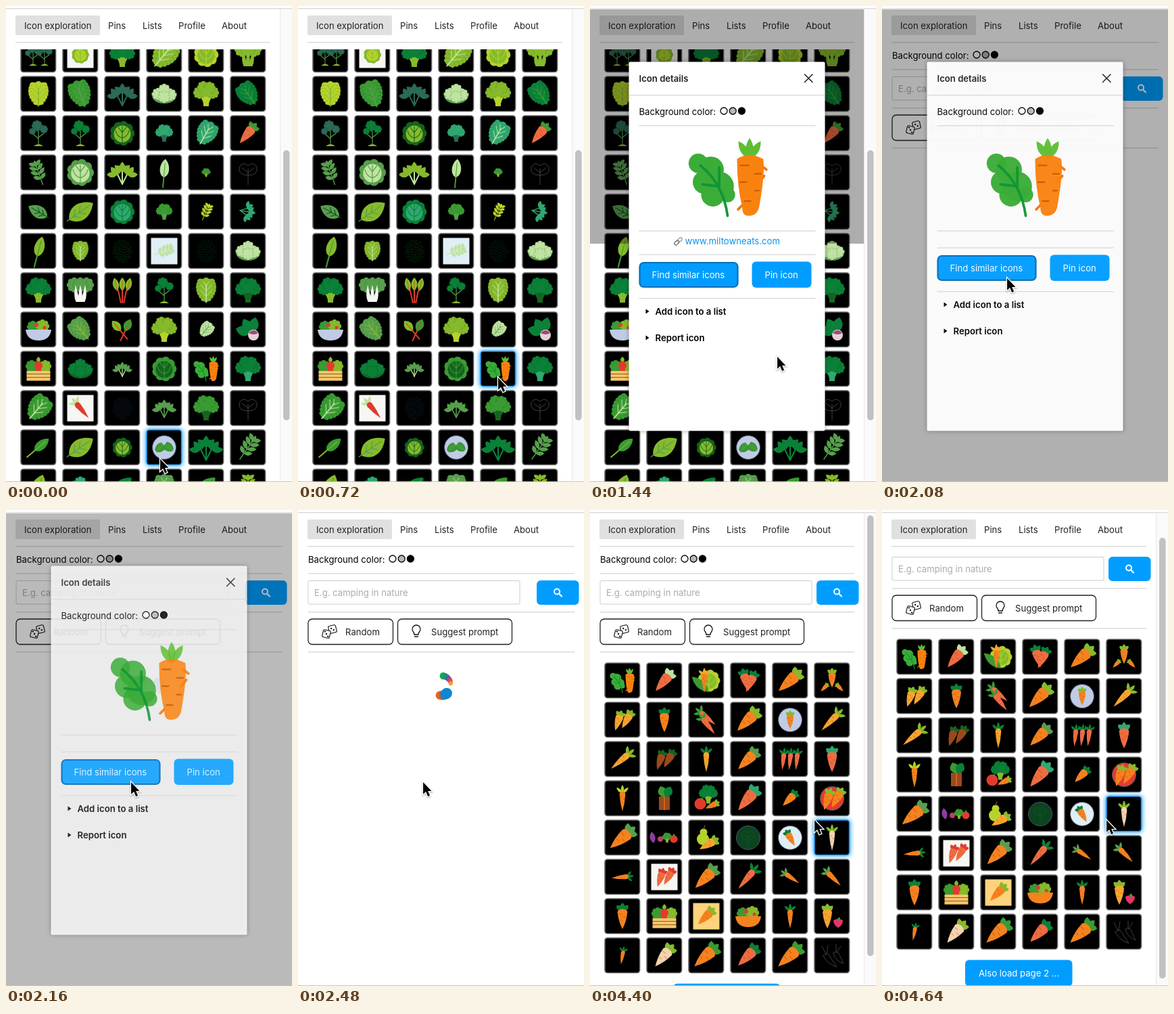
An HTML page with a canvas for the animation above (5140 ms loop, 423 px wide and 703 px high).

```html
<!DOCTYPE html>
<html lang="en">
<head>
<meta charset="utf-8">
<title>Icon exploration</title>
<style>
html, body { margin: 0; width: 423px; height: 703px; overflow: hidden; background: #fff; }
canvas { display: block; }
</style>
</head>
<body>
<canvas id="stage" width="423" height="703"></canvas>
<script>
const c = document.getElementById('stage').getContext('2d');
const LOOP = 5140, STEP = 80, BLUE = '#009dff';

const palette = {
  g: '#3a9b32', d: '#14641f', D: '#0c4420', l: '#86ba2c', y: '#b5d32c', p: '#bfe3a0', v: '#579f4c',
  t: '#2c6a55', m: '#2fa870', k: '#0b8038', o: '#f5821f', a: '#f7a52f', r: '#e23b2e', s: '#ee6c42',
  w: '#f6f6f2', b: '#c0cbe6', i: '#e0eef6', x: '#4a504a', z: '#163c5c', n: '#9a4a1c', c: '#f4d3ae', h: '#ffd27d'
};

// ---- drawing helpers ----
function fill(color, path) { c.fillStyle = color; c.fill(new Path2D(path)); }
function stroke(color, width, path) {
  c.strokeStyle = color; c.lineWidth = width; c.lineCap = 'round'; c.stroke(new Path2D(path));
}
function dot(x, y, r, color, edge, width = 1) {
  c.beginPath(); c.arc(x, y, r, 0, 7);
  c.fillStyle = color; c.fill();
  if (edge) { c.strokeStyle = edge; c.lineWidth = width; c.stroke(); }
}
function box(x, y, w, h, r, color, edge, width = 1) {
  c.beginPath(); c.roundRect(x, y, w, h, r);
  if (color) { c.fillStyle = color; c.fill(); }
  if (edge) { c.strokeStyle = edge; c.lineWidth = width; c.stroke(); }
}
function text(str, x, y, color = '#222', weight = 400) {
  c.font = `${weight} 13.15px Inter, sans-serif`;
  c.fillStyle = color; c.fillText(str, x, y);
}
function rule(x1, x2, y) { box(x1, y - 0.5, x2 - x1, 1.5, 0, '#dcdcdc'); }
function bush(color, x, y, r, n = 8) {
  for (let i = 0; i < n; i++) {
    const a = i / n * 2 * Math.PI;
    dot(x + Math.cos(a) * r * 0.65, y + Math.sin(a) * r * 0.65, r * 0.37, color, 'rgba(0,30,0,.16)', 0.8);
  }
  dot(x, y, r * 0.66, color);
}
function leaflet(color, x, y, len, width, deg) {
  c.save(); c.translate(x, y); c.rotate(deg * Math.PI / 180);
  fill(color, `M0 0Q${-width} ${-len / 2} 0 ${-len}Q${width} ${-len / 2} 0 0Z`);
  c.restore();
}
function root(a, b, w) {
  for (const deg of [-48, 48, 0]) leaflet(b, 0, -8, 12, w, deg);
  fill(a, `M${-w}-6C${-w}-12 ${w}-12 ${w}-6Q${w * 0.85} 7 0 19Q${-w * 0.85} 7 ${-w}-6Z`);
  stroke('rgba(150,50,0,.4)', 0.9, `M${-w * 0.8}-3h${w * 0.7}M${w * 0.7} 1h${-w * 0.6}M${-w * 0.5} 6h${w * 0.5}`);
}

// ---- icons: each is drawn around 0,0 and about 38 px wide ----
const shapes = {
  carrot: (a, b) => root(a, b, 7.3),
  slim: (a, b) => root(a, b, 4.3),
  carrots(a, b, cols) { icon(`carrot:${cols}:18`, -6, 1, 0.8); icon(`carrot:${cols}:30`, 7, -1, 0.8); },
  crossed(a, b, cols) { icon(`carrot:${cols}:-15`, -4, -1, 0.9); icon(`carrot:${cols}:25`, 4, 1, 0.9); },
  pair(a, b, cols) { icon(`slim:${cols}:-50`, -1, -5); icon(`slim:${cols}:-38`, 1, 6); },
  slims(a, b, cols) { for (const x of [-10, 0, 10]) icon(`slim:${cols}:6`, x, 0, 0.85); },
  trio(a, b, cols) {
    icon(`carrot:${cols}`, 0, -4, 0.75);
    icon(`carrot:${cols}:-45`, 11, 10, 0.42); icon(`carrot:${cols}:45`, -11, 10, 0.42);
  },
  duo() {
    for (const [x, y, r] of [[-14, -7, 4.6], [-8, -4, 6.2], [-11, 2, 5.6], [-4, 4, 7], [-7, 8, 5.6], [0, 8, 3.6]])
      dot(x, y, r, '#3bac38');
    stroke('#0f9537', 1.2, 'M-13-6Q-2 3 0 18M-4 4L-4-5M-4 4L-12 3');
    for (const deg of [-32, 0, 32]) leaflet('#5fbd35', 10.5, -9, 10, 3.5, deg);
    stroke('#ee760d', 1.2, 'M16-6L18.500-4M15 2L17.500-1M7 13L5 15');
    fill('#f9820f', 'M4.500-9Q10-13 17-9Q18-2 15 14Q14 18 10 18Q7 18 7 14Q4.500 4 4.500-9Z');
    stroke('#c65f08', 0.7, 'M6-6h4M13-2h3M6 2h3M13 6h2M8 11h3');
  },
  broccoli(a, b) {
    fill(b, 'M-4 18Q-3 10-11 2H11Q3 10 4 18Z');
    bush(a, -10, -2, 9); bush(a, 10, -2, 9); bush(a, -4, -10, 9); bush(a, 5, -9, 9); dot(0, -3, 7, a);
  },
  tree(a) {
    stroke(palette.v, 1.2, 'M0 18V-6M0 6L8 0M0 8L-8 1');
    bush(a, -2, -11, 8); bush(a, 8, -6, 6); bush(a, -9, -3, 5);
    fill(palette.l, 'M-7 19Q0 13 7 19Z');
  },
  trees(a, b, cols) { icon(`tree:${cols}`, -8, 0, 0.85); icon(`tree:${cols}`, 9, 0, 0.85); },
  lettuce(a, b) {
    for (let i = 0; i <= 6; i++) {
      const half = 13 * Math.sin(0.9 + i * 0.3), y = -13 + i * 4.3;
      for (const side of [-1, 1]) dot(side * half * 0.85, y, 4.6 - i * 0.25, a, 'rgba(0,30,0,.16)', 0.8);
      box(-half * 0.8, y - 4, half * 1.6, 8, 3, a);
    }
    dot(0, -14, 5, a);
    stroke(b, 1.6, 'M0 18V-8'); stroke(b, 0.9, 'M0 9L-8 0M0 9L8 0M0 1L-8-8M0 1L8-8M0-6L-4-13M0-6L4-13');
  },
  cabbage(a, b) {
    bush(a, 0, 0, 18, 9); dot(0, 1, 12.5, b);
    stroke(a, 1.1, 'M0 14V-10M0 7Q-8 5-10-4M0 7Q8 5 10-4M0-1L-6-9M0-1L6-9');
  },
  florets(a, b) {
    fill(a, 'M-19-2Q0 14 19-2Q18 14 0 14Q-18 14-19-2Z');
    for (const [x, y] of [[-9, 0], [9, 1], [0, -6], [0, 4]]) bush(b, x, y, 9);
  },
  leaf(a, b) {
    fill(a, 'M0 17C-15 8-12-8 0-19C12-8 15 8 0 17Z');
    stroke(b, 1.1, 'M0 20V-13M0 10L-6 4M0 10L6 4M0 2L-6-4M0 2L6-4');
  },
  spoon(a, b) {
    stroke(b, 2, 'M0 22V4'); fill(a, 'M0 7C-9 4-9-12 0-20C9-12 9 4 0 7Z'); stroke(b, 1, 'M0 6V-14');
  },
  sprig(a) {
    stroke(a, 1.4, 'M0 19V-12');
    for (let y = 10; y > -13; y -= 7)
      for (const side of [-1, 1]) leaflet(a, 0, y, 14 - Math.abs(y) / 4, 6, side * 55);
    leaflet(a, 0, -8, 11, 6, 0);
  },
  fan(a, b) {
    for (const x of [-1, 1, 0]) {
      stroke(b, 2, `M0 17L${x * 8} ${x ? 1 : -4}`);
      for (const deg of [-50, 0, 50]) leaflet(a, x * 8, x ? 4 : -1, 15, 8, x * 35 + deg);
    }
  },
  choy(a, b) {
    for (const x of [-9, 9, 0]) { bush(a, x, -8, 11); dot(x, -8, 8, a); }
    for (const x of [-7, 7, 0]) fill(b, `M${x / 2 - 3} 17Q${x - 4} 8 ${x}-8Q${x + 4} 8 ${x / 2 + 3} 17Z`);
  },
  chard(a, b) {
    for (const x of [-9, 9, 0]) {
      stroke(b, 2, `M${x / 4} 18Q${x / 2} 4 ${x}-9`);
      leaflet(a, x * 0.8, 1, 20, 9, x * 1.5);
      stroke(b, 0.8, `M${x * 0.8} 1L${x * 1.2}-14`);
    }
  },
  stalks(a, b) {
    for (const [turn, x] of [[-40, -4], [25, 5]]) {
      c.save(); c.translate(x, 0); c.rotate(turn * Math.PI / 180);
      stroke(b, 2, 'M0 18V-6'); leaflet(x < 0 ? palette.l : a, 0, 3, 20, 12, 0); stroke(b, 1, 'M0 3V-12');
      c.restore();
    }
  },
  beet(a) {
    for (const deg of [-75, -30, 15]) leaflet(a, 5, 5, 24, 15, deg);
    dot(8, 8, 8, '#e6cfd6'); fill('#9b4a78', 'M1 5Q8-3 15 5Q8 9 1 5Z');
  },
  bowl(a, b) {
    bush(b, -8, -4, 9); bush(palette.l, 6, -5, 10);
    dot(-3, -7, 3, palette.r); dot(9, -3, 2.5, palette.r);
    fill(a, 'M-19 0H19Q17 16 0 16Q-17 16-19 0Z');
  },
  crate(a, b) {
    bush(b, -10, -4, 9); bush(palette.l, 10, -4, 9); dot(-10, 0, 6, b); dot(10, 0, 6, palette.l);
    leaflet(palette.l, 0, -9, 9, 6, 0); dot(0, -5, 6, palette.r); box(-4, -4, 8, 9, 0, palette.r);
    for (const y of [3, 8, 13]) box(-17.500, y, 35, 4.6, 0, '#f7c568');
  },
  salad() {
    icon('cabbage:yl', 4, 0, 0.9); leaflet(palette.g, 4, 17, 34, 12, -48);
    icon('slim:oa', -3, 0, 0.95);
  },
  stump() {
    fill(palette.n, 'M-8-3H8V17H-8Z'); stroke(palette.o, 1, 'M0-2V17');
    leaflet(palette.g, 0, -2, 17, 13, -20); leaflet(palette.k, 2, -2, 17, 13, 25);
  },
  tomato() {
    icon('broccoli:kl', 3, -6, 0.75); dot(-9, 8, 8.5, palette.r);
    leaflet(palette.g, -9, 2, 5, 3, 60); icon('carrot:ol:65', 9, 10, 0.6);
  },
  medley() {
    leaflet('#8a3fa0', -16, 8, 17, 8, -10); dot(-6, 2, 4, '#c23a6a');
    icon('broccoli:gl', 4, 0, 0.4); dot(14, 2, 5.5, palette.r); leaflet(palette.g, 14, -1, 5, 3, 0);
  },
  pear() {
    dot(-5, 2, 9, palette.y); dot(-4, -8, 5.5, palette.y); stroke(palette.n, 1.2, 'M-4-13L-2-18');
    icon('carrot:al:60', 4, 9, 0.85);
  },
  berry() {
    icon('carrot:al', -7, 0, 0.95);
    fill('#e8336a', 'M2 6Q9 2 16 6Q16 13 9 17Q2 13 2 6Z'); leaflet(palette.g, 9, 7, 6, 4, 20);
  },
  twins() { icon('lettuce:gv:55', -7, 1, 0.42); icon('lettuce:gv:-55', 7, 0, 0.42); },
  outline(a) { stroke(a, 0.8, 'M0 18V-6M0 4Q-15 4-13-8Q-8-17 0-10Q8-17 13-8Q15 4 0 4M0 0L-9-7M0 0L9-7'); },
  roots(a) {
    stroke(a, 0.8, 'M-13 0Q-8-5-4 0L7 17Q-8 12-13 0M2-4Q6-7 10-3L17 12Q4 8 2-4M-9-2L-15-14M-8-2L-6-15M6-5V-16M7-5L13-14');
  },
  dust(a) {
    for (let i = 1; i < 90; i++) {
      const r = 17 * Math.sqrt(i / 90), q = i * 2.4;
      dot(r * Math.cos(q) * 0.85, r * Math.sin(q), 0.6, a);
    }
  },
  disc(a) { dot(0, 0, 17.5, a, '#4a5568', 1); },
  card(a) { box(-19.5, -19.5, 39, 39, 0, a); }
};

// spec: kind:colours:turn:size, layers joined by +
function icon(spec, x, y, scale = 1) {
  for (const part of spec.split('+')) {
    const [kind, cols = 'gl', turn = 0, size = 1] = part.split(':');
    c.save();
    c.translate(x, y); c.scale(scale * size, scale * size); c.rotate(turn * Math.PI / 180);
    shapes[kind](palette[cols[0]], palette[cols[1]], cols);
    c.restore();
  }
}

const greens = `
trees:t card:w+cabbage:ly::.7 broccoli:kl lettuce:lp:40:1.2 cabbage:yl choy:ll
lettuce:yl lettuce:gv:-20:1.1 fan:tt florets:vp broccoli:ly lettuce:kg:-35
tree:t tree:k cabbage:dl broccoli:mt::.7 lettuce:mp:30 carrot:sg:40
sprig:v:-20 cabbage:vp::1.1 fan:lp spoon:pg:5 broccoli:gl::.35 outline:x
leaf:vD:-60:.9 leaf:lv:55:1.2 cabbage:km broccoli:gv::.65 sprig:y:25:.7 fan:mm:100:.7
spoon:lg:15:1.1 lettuce:lp::.8 dust:d card:i+sprig:p:70:.8 dust:D florets:vp
broccoli:kl choy:vw chard:lr tree:k lettuce:lp broccoli:kd
bowl:bg lettuce:vl:-40 stalks:gr broccoli:ly lettuce:pv:40:.65 beet:k
crate:ag florets:dk fan:vp::.65 cabbage:gd duo broccoli:km
lettuce:gp:40:1.1 card:w+slim:rp:-40 dust:z fan:vv::.8 broccoli:gd outline:x
spoon:gl:50 leaf:lv:55:1.2 cabbage:dl::.8 disc:b+twins fan:kk::1.1 sprig:v:35:1.1
leaf:lg:20 florets:dm leaf:kg:45 lettuce:vp leaf:gk:45 sprig:l`.trim().split(/\s+/);

const carrots = `
duo carrot:sp:40:1.05 salad crossed:sk carrot:ol:48:1.2 trio:ol
carrots:al carrot:ok::.95 pair:sg carrot:ol:45:1.2 disc:b+carrot:ol::.7 slim:al:45:1.15
slim:al:50:1.15 carrots:nd slim:ak carrot:ov:45:1.1 slims:sk carrot:sm
slim:oy stump tomato carrot:sm:40:1.2 carrot:ok:45:.8 disc:r+carrots:ol::1.1
carrot:ov:50:1.25 medley pear disc:D+outline:d::.7 disc:i+carrot:ok:-30:.7 slim:cl
slim:ok:85:.85 card:w+carrots:sr::.95 carrot:ov:45:1.2 slim:sk:40:1.2 slim:ov:-55:.85 slim:ov:-45:.95
carrot:ok crate:rg card:h+carrot:ol:45:.9 bowl:og slim:ok::.95 berry
slim:ok:10:.7 carrot:cl:40:1.1 carrot:og:48:1.25 carrot:sk:45:1.1 carrot:og:48:1.25 roots:x`.trim().split(/\s+/);

// ---- motion ----
const path = [[80, 227, 669], [480, 295, 549], [1200, 295, 549], [1440, 276, 518],
  [1840, 184, 402], [2880, 184, 402], [3360, 331, 458]];
function pointer(t) {
  if (t <= path[0][0]) return path[0].slice(1);
  for (let i = 1; i < path.length; i++) {
    const [t1, x1, y1] = path[i], [t0, x0, y0] = path[i - 1];
    if (t > t1) continue;
    const k = (t - t0) / (t1 - t0), e = k * k * (3 - 2 * k);
    return [x0 + (x1 - x0) * e, y0 + (y1 - y0) * e];
  }
  return path[path.length - 1].slice(1);
}
function tileAt(t, top) {
  const [x, y] = pointer(t), col = Math.floor((x - 21) / 62), row = Math.floor((y - top + 1) / 58);
  return (x - 21) % 62 < 54 && (y - top + 1) % 58 < 54 ? row * 6 + col : -1;
}

// ---- page parts ----
function swatches(x, y) {
  ['#fff', '#b8b8b8', '#000'].forEach((color, i) => dot(x + i * 13.2, y, 5, color, '#000', 1.3));
}
function grid(list, top, t, active) {
  list.forEach((spec, i) => {
    const x = 22 + i % 6 * 62, y = top + Math.floor(i / 6) * 58;
    let glow = 0;
    if (active) for (let k = 0; k < 4; k++) glow += (tileAt(t - k * STEP, top) === i) / 4;
    c.save();
    if (glow) { c.shadowColor = BLUE; c.shadowBlur = 7 * glow; }
    box(x, y, 51.5, 51.5, 4, '#000', glow ? '#2b93e0' : '#696969', 1.7);
    c.restore();
    box(x + 1, y + 1, 49.5, 49.5, 3, '#000');
    icon(spec, x + 26, y + 26);
  });
}
function die(x, y, turn, pips) {
  c.save(); c.translate(x, y); c.rotate(turn);
  box(-5.5, -5.5, 11, 11, 2, '#fff', '#111', 1.1);
  for (let i = 0; i < pips; i++) dot((i - (pips - 1) / 2) * 3, (i - (pips - 1) / 2) * 3, 1.2, '#111');
  c.restore();
}
function form(right) {
  text('Background color:', 15, 77.5, '#000'); swatches(140, 72);
  rule(15, right, 93.5);
  box(15, 104.5, 313, 34.5, 2, '#fff', '#ccc');
  text('E.g. camping in nature', 24, 126.5, '#aaa');
  box(right - 56, 104, 62.5, 36, 6, BLUE);
  dot(right - 26, 120.5, 4, BLUE, '#fff', 2); stroke('#fff', 2.2, `M${right - 22.5} 124l3.500 3.500`);
  rule(15, right, 150.5);
  box(15, 161, 125.5, 37.5, 6, '#fff', '#222', 1.3);
  die(51, 176, -0.25, 2); die(42, 183, 0.25, 3);
  text('Random', 70, 184.5);
  box(147.500, 161, 169, 37.5, 6, '#fff', '#222', 1.3);
  stroke('#111', 1.3, 'M172 184C172 180 169 180 169 176A6 6 0 0 1 181 176C181 180 178 180 178 184ZM172.500 187H177.500');
  text('Suggest prompt', 197, 184.5);
  rule(15, right, 209.5);
}
function nav(right) {
  box(0, 0, 423, 64, 0, '#fff');
  box(0, 3, 423, 1.5, 0, '#dcdcdc');
  box(14, 14, 125, 29, 2, '#e0e0e0');
  text('Icon exploration', 27, 33.5);
  text('Pins', 151, 33.5); text('Lists', 202, 33.5); text('Profile', 255, 33.5); text('About', 319, 33.5);
  rule(14, right, 53.5);
}
function scrollbar(y, h) {
  box(405, 5, 18, 698, 0, '#fafafa'); box(405, 5, 1, 698, 0, '#e6e6e6');
  box(410, y, 9.5, h, 5, '#c1c1c1');
}
function spinner(t) {
  c.save(); c.translate(216, 261); c.rotate((t - 2480) / 1200 * 2 * Math.PI);
  const strand = (colors, from, to, r0, r1, s0, s1) => colors.forEach((color, i) => {
    const k = i / (colors.length - 1), a = (from + (to - from) * k) * Math.PI / 180, r = r0 + (r1 - r0) * k;
    dot(r * Math.cos(a), r * Math.sin(a), s0 + (s1 - s0) * k, color);
  });
  strand(['#0aae4a', '#1aa05a', '#2f7f9a', '#6a55a8', '#c0448a', '#e8503a', '#f9a21f'], -94, -25, 16, 11, 5.3, 3);
  strand(['#f0641e', '#e2691f', '#8c6a60', '#2a7fc0', '#0f86d4'], 115, 68, 14, 10.5, 6.5, 8);
  c.restore();
}
function dialog(x, alpha, cleared, width, bottom) {
  c.save();
  c.globalAlpha = alpha;
  box(0, 5, width, bottom - 5, 0, 'rgba(0,0,0,.32)');
  c.save(); c.shadowColor = 'rgba(0,0,0,.35)'; c.shadowBlur = 6;
  box(x, 82.5, 290, 545, 2, '#fff'); c.restore();
  c.translate(x, 0);
  text('Icon details', 15, 111.5, '#222', 600);
  stroke('#111', 1.4, 'M260 101l11.500 11.500M271.500 101l-11.500 11.500');
  rule(0, 290, 131.5);
  text('Background color:', 15, 160.5, '#000'); swatches(140.5, 155);
  rule(15, 276, 176.5);
  icon('duo', 146, 254, 3.1);
  rule(15, 276, 332);
  if (!cleared) {
    c.save(); c.translate(73, 347.5); c.rotate(-0.75);
    box(-7, -2.3, 8, 4.6, 2.3, null, '#666', 1.3); box(-1, -2.3, 8, 4.6, 2.3, null, '#999', 1.3);
    c.restore();
    text('www.miltowneats.com', 83, 352, '#0b93ee');
  } else c.translate(0, -10);
  rule(15, 276, 367);
  box(16, 379, 145, 36, 6, BLUE, '#0a6db5', 2.2); text('Find similar icons', 34, 401.5, '#fff');
  box(182, 377.5, 88, 38.500, 6, BLUE); text('Pin icon', 201, 401.5, '#fff');
  rule(15, 276, 431.5);
  ['Add icon to a list', 'Report icon'].forEach((label, i) => {
    const y = 451 + i * 39;
    fill('#000', `M25 ${y - 3.5}l5 3.500l-5 3.500Z`); text(label, 39, y + 4.700, '#000', 600);
  });
  c.restore();
}
function cursor(x, y) {
  c.save(); c.translate(x, y); c.scale(1.08, 1.08);
  c.shadowColor = 'rgba(0,0,0,.35)'; c.shadowBlur = 2; c.shadowOffsetY = 1;
  const arrow = 'M1 0V16.500L4.800 13L7.500 19.500L10.300 18.300L7.600 12H12.500Z';
  stroke('#fff', 2.4, arrow); c.shadowColor = 'transparent'; fill('#000', arrow);
  c.restore();
}

function draw(t) {
  const OPEN = 880, CLEAR = 2000, CLOSED = 2400, RESULTS = 2960;
  const loading = t >= CLEAR && t < RESULTS, right = loading ? 409 : 391;
  const open = t >= OPEN && t < CLOSED;
  const k = Math.min(1, Math.max(0, (t - 4400) / 240)), scroll = 35 * k * (2 - k);
  box(0, 0, 423, 703, 0, '#fff');
  if (t < CLEAR) grid(greens, 46, t, !open);
  else {
    c.save(); c.translate(0, -scroll); form(right); c.restore();
    if (loading) spinner(t);
    else {
      grid(carrots, 226 - scroll, t, true);
      box(123, 699.5 - scroll, 158.5, 39, 6, BLUE);
      text('Also load page 2 ...', 143, 723.5 - scroll, '#fff');
    }
  }
  nav(right);
  if (open) {
    const alpha = t < CLEAR ? Math.min(1, (t - OPEN + STEP) / 240) : 1 - ((t - CLEAR) / 400) ** 2;
    dialog(loading ? 66.5 : 57.5, alpha, loading, loading ? 423 : 405, t < 1520 ? 351 : 702);
  }
  if (t < CLEAR) scrollbar(213, 399);
  else if (!loading) scrollbar(8 + scroll * 33 / 35, 651);
  box(0, 702, 423, 1, 0, '#c9c2c8');
  cursor(...pointer(t));
}

let last = -1;
function tick() {
  const t = Math.min(4640, Math.floor(performance.now() % LOOP / STEP) * STEP);
  if (t !== last) draw(last = t);
  requestAnimationFrame(tick);
}
tick();
</script>
</body>
</html>
```
